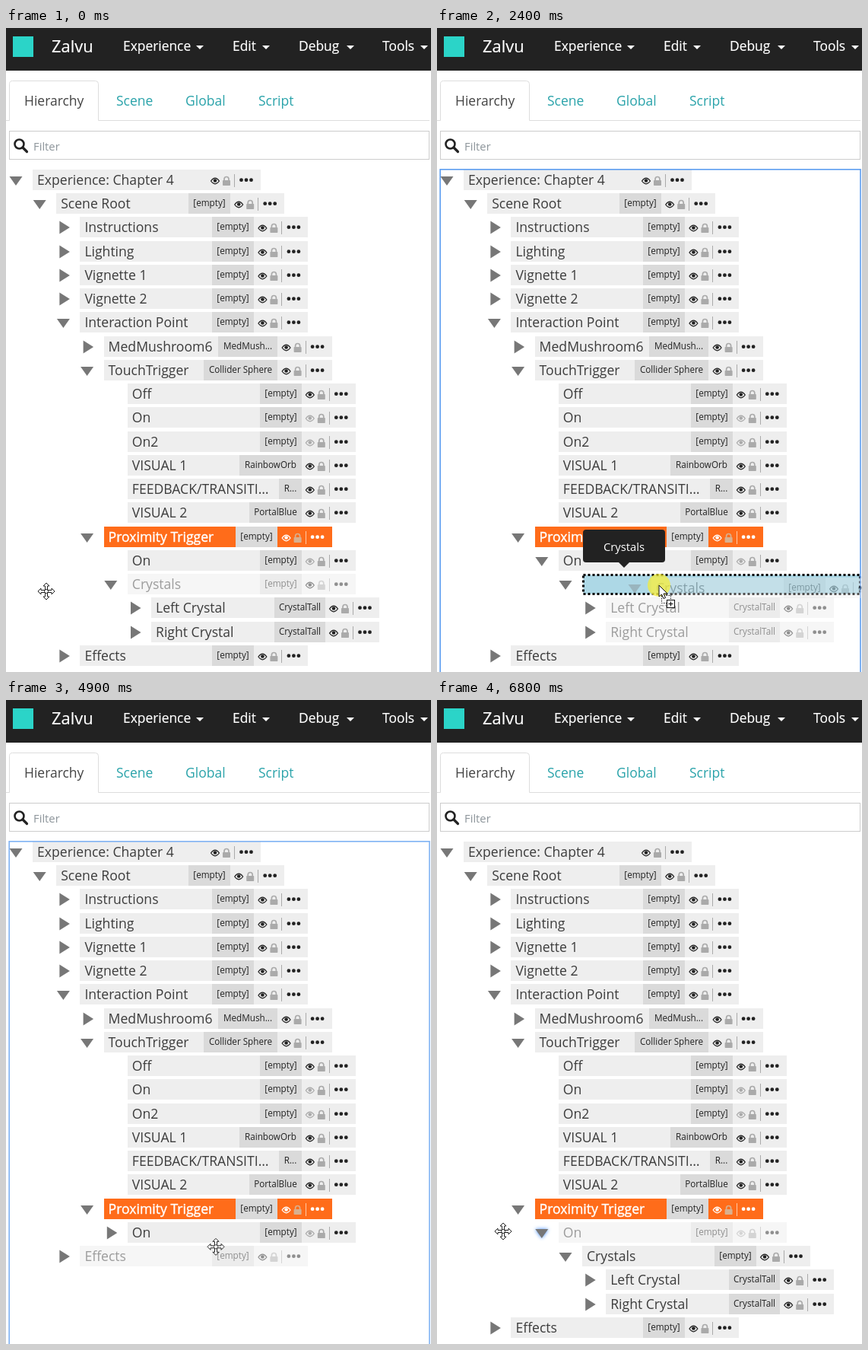
Animation of 559x846 px, one loop 8.5 s. Source, as an HTML page:

```html
<!DOCTYPE html>
<html lang="en">
<head>
<meta charset="utf-8">
<title>Scene hierarchy</title>
<style>
html, body { margin: 0; width: 100%; height: 100%; overflow: hidden; background: #fff; }
svg { display: block; width: 100vw; height: 100vh; font-family: "Open Sans", "Noto Sans", sans-serif; }
text { white-space: pre; }
.label { font-size: 17.6px; fill: #3c3c3c; }
.tag { font-size: 11.7px; fill: #222; text-anchor: middle; }
.tip { font-size: 14.8px; fill: #fff; text-anchor: middle; }
.menu { font-size: 17.4px; fill: #fff; stroke: #fff; stroke-width: .2; }
.tab { font-size: 17.5px; fill: #2aa3aa; }
</style>
</head>
<body>
<svg viewBox="0 0 559 846" preserveAspectRatio="none">
  <g id="chrome"></g>
  <g id="tree"></g>
  <g id="over"></g>
</svg>
<script>
const $ = id => document.getElementById(id);
const LOOP = 8500, STEP = 100;
const TAG_WIDTH = {
  '[empty]': 55, 'MedMush...': 78, 'Collider Sphere': 97, 'RainbowOrb': 82,
  'R...': 30, 'PortalBlue': 69, 'CrystalTall': 67
};

const rect = (x, y, w, h, fill, more = '') =>
  `<rect x="${x}" y="${y}" width="${w}" height="${h}" fill="${fill}" ${more}/>`;
const path = (d, fill, more = '') => `<path d="${d}" fill="${fill}" ${more}/>`;
const text = (x, y, s, cls, more = '') =>
  `<text x="${x}" y="${y}" class="${cls}" ${more}>${s}</text>`;
const group = (content, attrs) => `<g ${attrs}>${content}</g>`;
const rowX = depth => 35 + depth * 31.2;
const rowY = i => Math.ceil(199.5 + i * 31.25);

function drawChrome() {
  const menu = [['Experience', 154, 255], ['Edit', 298, 342], ['Debug', 385, 453], ['Tools', 495, 550]];
  const tabs = [['Scene', 145], ['Global', 236], ['Script', 332]];
  $('chrome').innerHTML =
    rect(0, 0, 559, 56, '#222') +
    rect(9, 11, 27, 27, '#2bd4c8') +
    text(60, 32, 'Zalvu', 'menu', 'style="font-size:21.9px"') +
    menu.map(([s, x, c]) => text(x, 30, s, 'menu') + path(`M${c - 5} 23h10l-5 5z`, '#fff')).join('') +
    path('M0 121.5H4.5V73.5a4 4 0 0 1 4-4H117.5a4 4 0 0 1 4 4V121.5H557', 'none', 'stroke="#ddd"') +
    text(24, 102, 'Hierarchy', 'tab', 'style="fill:#444"') +
    tabs.map(([s, x]) => text(x, 102, s, 'tab')).join('') +
    rect(4.5, 135.5, 552, 37, '#fff', 'stroke="#ccc"') +
    '<circle cx="17.5" cy="152.5" r="6" fill="none" stroke="#222" stroke-width="2.6"/>' +
    path('M22 157l5.5 5.5', 'none', 'stroke="#222" stroke-width="3.2" stroke-linecap="round"') +
    text(36, 161, 'Filter', 'tab', 'style="font-size:14.8px;fill:#8d959b"');
}

function eye(x, y, color) {
  return path(`M${x - 5.5} ${y}q5.5 -7.6 11 0q-5.5 7.6 -11 0z`, 'none', `stroke="${color}" stroke-width="1.2"`) +
    `<circle cx="${x}" cy="${y - .5}" r="2.3" fill="${color}"/>`;
}

function lock(x, y, color) {
  return rect(x - 5, y - 1, 10, 7, color, 'rx=".8"') +
    path(`M${x - 3} ${y}v-2.5a3 3 0 0 1 6 0v2.5`, 'none', `stroke="${color}" stroke-width="1.7"`);
}

function arrow(x, y, open, glow) {
  const d = open ? `M${x - 30.5} ${y - 5}h17l-8.5 12z` : `M${x - 27} ${y - 8.5}l13.5 8.5l-13.5 8.5z`;
  return path(d, '#777', glow ? 'style="filter:drop-shadow(0 0 2.5px #3f8cff)"' : '');
}

// Name, tag and icons of one row; x is the left edge, y the middle.
function rowBody(x, y, r) {
  const ink = r.hot ? '#fff' : '#222';
  const top = y - 14;
  let s = rect(Math.round(x), top, 300, 27, r.hot ? '#ff6c1a' : '#eee');
  s += text(x + 6, y + 6, r.name, 'label', r.hot ? 'style="fill:#fff;stroke:#fff;stroke-width:.4"' : '');
  if (r.tag) {
    const w = TAG_WIDTH[r.tag], left = Math.round(x + 228.7) - w;
    s += rect(left, top, w, 27, '#dadada') + text(left + w / 2, y + 3.3, r.tag, 'tag');
  }
  s += eye(x + 240, y + 1, r.dim ? '#aaa' : ink);
  s += lock(x + 255, y + 1, r.hot ? '#d9b08f' : '#aaa');
  s += rect(Math.round(x + 265), y - 8, 1, 17, r.hot ? '#ffc9a5' : '#aaa');
  for (let k = -1; k < 2; k++) s += `<circle cx="${x + 281 + k * 6.5}" cy="${y - .3}" r="2.4" fill="${ink}"/>`;
  return s;
}

function row(r, i) {
  const x = rowX(r.depth), y = rowY(i);
  const mark = r.open === undefined ? '' : arrow(x, y, r.open, r.glow);
  if (r.slot) {
    return mark + rect(x + 1.5, 718.5, 555 - x, 25, '#add8e6',
      'stroke="#000" stroke-width="3" stroke-dasharray="3 3"');
  }
  return mark + group(rowBody(x, y, r), `opacity="${r.fade ? .5 : 1}"`);
}

const item = (depth, name, open, tag = '[empty]', more = {}) => ({ depth, name, open, tag, ...more });

const fixedRows = [
  item(0, 'Experience: Chapter 4', true, ''),
  item(1, 'Scene Root', true),
  ...['Instructions', 'Lighting', 'Vignette 1', 'Vignette 2'].map(n => item(2, n, false)),
  item(2, 'Interaction Point', true),
  item(3, 'MedMushroom6', false, 'MedMush...'),
  item(3, 'TouchTrigger', true, 'Collider Sphere'),
  item(4, 'Off'),
  item(4, 'On', undefined, '[empty]', { dim: true }),
  item(4, 'On2', undefined, '[empty]', { dim: true }),
  item(4, 'VISUAL 1', undefined, 'RainbowOrb'),
  item(4, 'FEEDBACK/TRANSITI…', undefined, 'R...'),
  item(4, 'VISUAL 2', undefined, 'PortalBlue'),
  item(3, 'Proximity Trigger', true, '[empty]', { hot: true })
];

function crystals(depth, fade, slot, fadeKids) {
  return [
    item(depth, 'Crystals', true, '[empty]', { fade, slot }),
    ...['Left', 'Right'].map(n => item(depth + 1, n + ' Crystal', false, 'CrystalTall', { fade: fadeKids }))
  ];
}

function rowsAt(t) {
  const dragging = t >= 1900 && t < 3600;
  const slotDepth = t < 2200 ? 4 : 5;
  const shut = t >= 4000 && t < 5900, opened = t >= 5900;
  const overOn = t >= 5000 && t < 5800 || t >= 6400;
  const on = item(4, 'On', undefined, '[empty]', { dim: true, fade: overOn, glow: opened });
  if (shut) on.open = false;
  if (opened || dragging && slotDepth === 5) on.open = true;

  let kids = [];
  if (dragging) kids = crystals(slotDepth, false, true, true);
  else if (opened) kids = crystals(5);
  else if (!shut) kids = crystals(4, t < 1200 || t >= 3600);
  const effects = item(2, 'Effects', false, '[empty]', { fade: shut && !overOn });
  return [...fixedRows, on, ...kids, effects];
}

// Pointer stops: time, x, y.
const stops = [
  [0, 53, 740], [300, 112, 748], [500, 190, 744], [800, 264, 731], [1700, 264, 731],
  [1800, 269, 731], [2400, 292, 732], [3500, 292, 732], [3600, 292, 731], [4700, 292, 731],
  [5000, 268, 712], [5400, 159, 701], [5600, 140, 700], [6300, 140, 700], [6600, 91, 698],
  [6700, 91, 698], [6800, 87, 698], [LOOP, 87, 698]
];

function pointerAt(t) {
  const n = stops.findIndex(s => s[0] > t);
  const [t0, x0, y0] = stops[n - 1], [t1, x1, y1] = stops[n];
  const k = (t - t0) / (t1 - t0);
  return [x0 + (x1 - x0) * k, y0 + (y1 - y0) * k];
}

function moveCursor() {
  const outline = 'M0 -11L-4 -7H-1.5V-1.5H-7V-4L-11 0L-7 4V1.5H-1.5V7H-4L0 11L4 7H1.5V1.5H7V4L11 0L7 -4V-1.5H1.5V-7H4Z';
  return path(outline, '#fff', 'stroke="#222" stroke-linejoin="round"') +
    path('M0 -3L3 0L0 3L-3 0Z', '#fff', 'stroke="#222" stroke-width=".8"');
}

function dragCursor() {
  return rect(3.5, 13.5, 12, 10, 'none', 'stroke="#222" stroke-dasharray="1.5 1.5"') +
    path('M0 0V15L3.5 12L6 17.5L8.5 16.5L6 11H11Z', '#fff', 'stroke="#111"') +
    rect(10.5, 19.5, 10, 10, '#fff', 'stroke="#111"') +
    path('M15.5 21.5v6M12.5 24.5h6', 'none', 'stroke="#111" stroke-width="1.2"');
}

function tooltip(cx, y, w, label) {
  return rect(cx - w / 2, y, w, 43, '#222', 'rx="4"') +
    path(`M${cx - 8} ${y + 42}h16l-8 8z`, '#222') + text(cx, y + 28, label, 'tip');
}

function draw(t) {
  $('tree').innerHTML = rowsAt(t).map(row).join('');

  const [x, y] = pointerAt(t);
  const dragging = t >= 1900 && t < 3600;
  const pressed = t >= 1100 && t < 3400 || t >= 5700 && t < 6100;
  let s = '';
  if (t >= 1200 && t < 5900) {
    s += rect(4.2, 185.8, 552.8, 670, 'none',
      `stroke="${dragging ? '#5c9df0' : '#7fb2f3'}" stroke-width="1.6"`);
  }
  if (dragging && t < 3400) {
    const gx = x - 10, gy = y + 4;
    const ghost = { name: 'Crystals', tag: '[empty]' };
    s += group(arrow(gx, gy, true) + rowBody(gx, gy, ghost), 'opacity=".35"');
  }
  if (t >= 500 && t < 3600) s += tooltip(246, 659, 108, 'Crystals');
  if (t >= 5000 && t < 5500) s += tooltip(247, 627, 74, 'On');

  const halo = pressed ? `<circle cx="${x}" cy="${y}" r="15" fill="#f8ee2c" opacity=".7"/>` : '';
  const at = `transform="translate(${x} ${y})"`;
  s += dragging ? halo + group(dragCursor(), at) : group(moveCursor(), at) + halo;
  $('over').innerHTML = s;
}

let shown = -1;
function tick(now) {
  const t = Math.floor(now % LOOP / STEP) * STEP;
  if (t !== shown) draw(shown = t);
  requestAnimationFrame(tick);
}

drawChrome();
draw(0);
requestAnimationFrame(tick);
</script>
</body>
</html>
```
